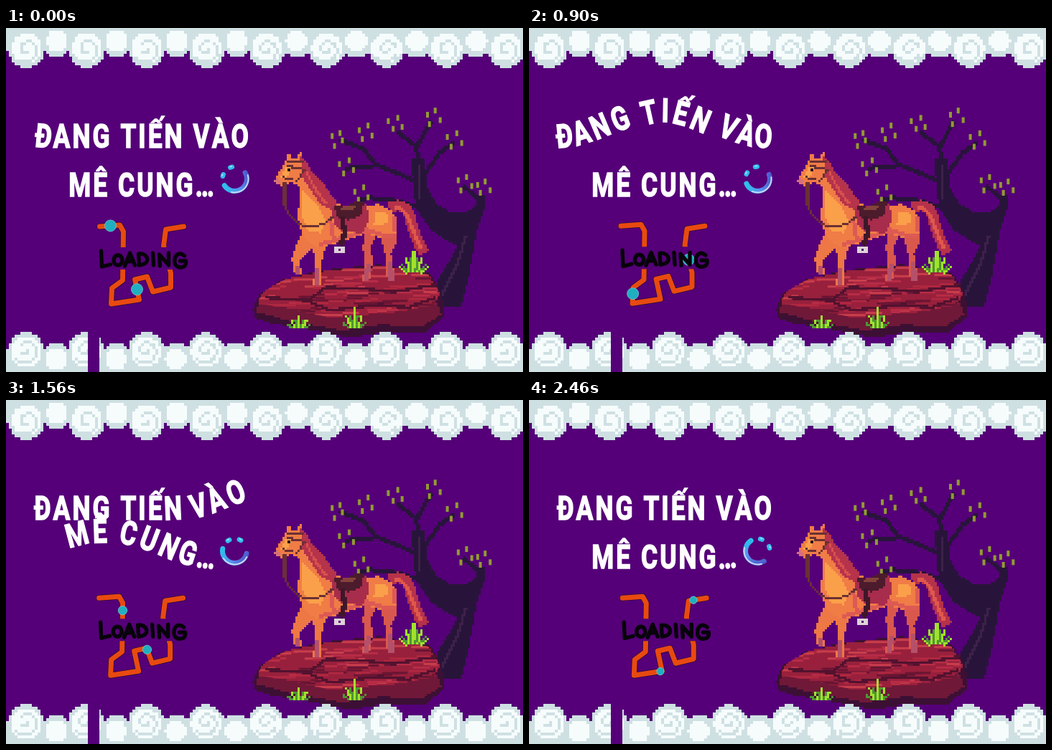
An HTML page with a canvas for the animation above (2520 ms loop, 720 by 480 pixels).

```html
<!DOCTYPE html>
<html lang="vi">
<head>
<meta charset="utf-8">
<style>
html, body { margin: 0; width: 100%; height: 100%; overflow: hidden; background: #550078; }
canvas { display: block; width: 720px; height: 480px; }
svg { display: none; }
</style>
</head>
<body>
<canvas id="stage" width="720" height="480"></canvas>
<svg><path id="track" d="M128,277 L156,275 L161,284 L160,352 L145,363 L144,385 L183,379 L177,351 L194,347 L202,368 L227,362 L227,342 L217,304 L220,281 L245,277"/></svg>
<script>
const LOOP = 2520, TICK = 60, TAU = Math.PI * 2;
const ctx = document.getElementById('stage').getContext('2d');
const scenery = document.createElement('canvas');
scenery.width = 720;
scenery.height = 480;
const art = scenery.getContext('2d');

let seed = 7;
const random = () => (seed = seed * 16807 % 2147483647) / 2147483647;

// Pixel art: every path is sampled on a square grid inside the current box.
let box, cell;
function region(left, top, right, bottom, size) {
  box = { left, top, right, bottom };
  cell = size;
}
function pixels(shape, color, width) {
  const path = typeof shape === 'string' ? new Path2D(shape) : shape;
  art.fillStyle = color;
  art.lineWidth = width || 1;
  for (let y = box.top; y < box.bottom; y += cell)
    for (let x = box.left; x < box.right; x += cell) {
      const px = x + cell / 2, py = y + cell / 2;
      if (width ? art.isPointInStroke(path, px, py) : art.isPointInPath(path, px, py)) art.fillRect(x, y, cell, cell);
    }
}

function disc(path, x, y, r) {
  path.moveTo(x + r, y);
  path.arc(x, y, r, 0, TAU);
}

// Swirls and small puffs alternate; side is 1 for the top row, -1 for the bottom row.
function clouds(edge, side, start) {
  const base = new Path2D(), white = new Path2D(), curls = new Path2D();
  const swirlY = edge + side * 30, puffY = edge + side * 21, pitch = 83.5;
  base.rect(0, Math.min(edge, edge + side * 30), 720, 30);
  for (let x = start; x < 760; x += pitch) {
    disc(base, x, swirlY, 25);
    disc(white, x, swirlY - side * 2, 21);
    disc(base, x + pitch / 2, puffY, 20);
    disc(white, x + pitch / 2, puffY - side * 3, 15);
    for (let a = 0; a < 9; a += 0.25) {
      const r = 2 + a * 1.9;
      curls[a ? 'lineTo' : 'moveTo'](x + r * Math.cos(a), swirlY + r * Math.sin(a));
    }
  }
  pixels(base, '#cfe0e3');
  pixels(white, '#f6fcfc');
  pixels(curls, '#cfe0e3', 3.5);
}

function grass(x, y, reach, height) {
  for (let i = -reach; i <= reach; i++) {
    const top = y - height * (1 - Math.abs(i) / (reach + 2)) + (i & 1) * 4;
    pixels(`M${x + i * 2.5},${y} L${x + i * 5.5},${top}`, i & 1 ? '#4f9434' : '#a2e22c', 3.5);
  }
}

function drawTree() {
  const bark = '#28143a';
  pixels('M590,390 L602,350 L622,318 L628,304 L612,296 L592,282 L574,256 L567,230 L566,182 L582,182 L586,222 L600,246 L622,258 L640,258 L654,248 L656,232 L666,232 L666,252 L656,282 L652,304 L644,350 L634,390Z', bark);
  pixels('M576,216 Q540,200 514,190 L498,168 L464,156 M516,192 L472,196 M590,260 Q550,234 492,238', bark, 6);
  pixels('M576,186 L570,164 L544,144 M572,166 L592,130 M580,208 L604,174 L624,160 M660,240 L636,220', bark, 6);
  pixels('M606,375 L630,326 L640,290 M576,240 L575,190', '#3d2149', 4);
  const tips = [[460, 154], [498, 146], [472, 194], [492, 232], [540, 134], [592, 124], [622, 156], [636, 216], [662, 222]];
  art.fillStyle = '#929b32';
  for (const [x, y] of tips)
    for (let a = 0.4; a < TAU; a += TAU / 4) {
      const r = 7 + random() * 5;
      art.fillRect(x + r * Math.cos(a), y + r * Math.sin(a) - 4, 4, 8);
    }
}

function drawRock() {
  pixels('M344,392 L352,372 L384,352 L440,338 L520,330 L590,342 L608,372 L610,402 L584,426 L530,424 L480,432 L420,420 L368,412 L346,404Z', '#3c1034');
  pixels('M348,396 L356,376 L400,392 L450,404 L520,398 L600,382 L606,400 L580,416 L520,414 L470,422 L400,410Z', '#701838');
  const slab = new Path2D('M350,384 L358,368 L390,350 L450,338 L530,332 L588,344 L604,370 L596,386 L548,396 L500,400 L450,404 L400,392Z');
  pixels(slab, '#98203c');
  art.save();
  art.clip(slab);
  for (let i = 0; i < 60; i++) {
    const x = 345 + random() * 250, y = 336 + random() * 64, length = 12 + random() * 34;
    art.fillStyle = ['#b82c46', '#6a1534', '#b02840', '#c83e4c'][i % 4];
    art.fillRect(x, y, length, 3);
    art.fillRect(x + length, y - 3, length / 2, 3);
  }
  art.restore();
  pixels('M360,376 L420,380 L446,362 L500,364 L540,368 L600,358 M420,380 L450,394 L520,386 L560,390 L598,376', '#52122f', 4);
}

function drawHorse() {
  pixels('M534,251 Q556,241 563,264 Q568,290 582,314', '#b6324a', 15);
  pixels('M540,250 Q557,250 564,276 L578,308', '#e0584c', 5);
  pixels('M500,276 L520,280 L509,304 L510,328 L506,354 L496,354 L500,330 L497,306Z M518,278 L542,272 L544,298 L536,314 L542,352 L531,354 L528,316Z', '#d9584e');
  pixels('M414,284 L404,304 L398,322 L402,344 L412,344 L408,324 L420,312 L434,298Z M426,292 L446,300 L439,328 L438,360 L427,360 L431,334Z', '#ee7746');
  pixels('M405,332 L407,344 M434,334 L432,360 M505,330 L501,354 M535,326 L537,353', '#b4506a', 7);
  pixels('M394,172 L399,184 L404,183 L410,170 L414,184 L424,200 L438,222 L456,244 L480,250 L520,246 L536,254 L544,270 L542,292 L522,294 L502,286 L470,298 L440,306 L424,302 L412,286 L406,264 L409,240 L409,222 L398,214 L388,221 L377,218 L375,209 L384,196 L390,184Z', '#f07c46');
  pixels('M412,226 L434,246 L446,270 L438,286 L420,282 L411,260Z M514,256 L530,258 L532,272 L512,276Z M392,190 L402,194 L388,210 L382,208Z', '#fba04a');
  pixels('M436,302 L470,293 L502,282 L524,289 L540,290 M540,264 L541,284 M452,270 L456,292', '#dd5a54', 6);
  pixels('M410,180 L420,190 L430,206 L444,220 L460,242 L464,256 L450,252 L436,244 L424,226 L412,206Z', '#b5334b');
  pixels('M416,196 L428,220 L446,246', '#d9504c', 4);
  pixels('M454,250 L502,246 L506,268 L496,286 L466,284 L456,272Z', '#a82c4c');
  pixels('M456,246 L470,250 L486,242 L498,242 L496,260 L478,268 L462,264Z', '#4c1b2c');
  pixels('M466,252 L488,250', '#84443b', 4);
  pixels('M468,264 L472,286 L466,304', '#3f1729', 7);
  pixels('M460,306 h9 v7 h-9Z', '#ded2d8', 3);
  pixels('M390,192 L416,198 L404,216 M392,186 L414,186 M384,208 L400,212 M388,216 L388,248 Q398,272 420,278 Q446,276 456,262', '#6b3034', 3);
  pixels('M376,211 L382,217', '#d8707a', 7);
  art.fillStyle = '#2c1024';
  art.fillRect(392, 196, 4, 4);
}

function drawScenery() {
  art.fillStyle = '#550078';
  art.fillRect(0, 0, 720, 480);
  region(340, 104, 680, 440, 3);
  drawTree();
  drawRock();
  drawHorse();
  grass(408, 418, 3, 18);
  grass(485, 418, 3, 28);
  grass(568, 342, 4, 32);
  region(0, 0, 720, 60, 4);
  clouds(0, 1, 29);
  region(0, 424, 720, 480, 4);
  clouds(480, -1, 28);
  art.fillStyle = '#550078';
  art.fillRect(114, 424, 16, 56);
}

// Heading: a raised-cosine bump runs through the letters of both lines.
const FONT = 'bold 46px Roboto, sans-serif', CONDENSE = 0.77, HEIGHT = 36, REACH = 5.3;
const letters = [];
function layoutLine(text, baseline) {
  ctx.font = FONT;
  const advance = char => ctx.measureText(char).width * CONDENSE + 3;
  let x = 188.5 - [...text].reduce((sum, char) => sum + advance(char), -3) / 2;
  for (const char of text) {
    const width = advance(char);
    if (char !== ' ') letters.push({ char, x: x + (width - 3) / 2, y: baseline });
    x += width;
  }
}

function drawHeading(t) {
  const peak = (t - 450) / 91.5;
  ctx.font = FONT;
  ctx.textAlign = 'center';
  ctx.fillStyle = ctx.strokeStyle = '#fff';
  ctx.lineWidth = 1.6;
  letters.forEach(({ char, x, y }, index) => {
    const d = Math.max(-REACH, Math.min(REACH, index - peak));
    const angle = Math.PI * d / REACH;
    const slope = HEIGHT * Math.PI / 2 / REACH * Math.sin(angle) / 25;
    ctx.save();
    ctx.translate(x, y - HEIGHT * Math.cos(angle / 2) ** 2);
    ctx.rotate(Math.atan(slope));
    ctx.scale(CONDENSE, 1);
    ctx.fillText(char, 0, 0);
    ctx.strokeText(char, 0, 0);
    ctx.restore();
  });
}

function drawSmile(t) {
  const tilt = -Math.PI / 4 * Math.cos(Math.PI * (t / LOOP) ** 1.5);
  const shade = ctx.createLinearGradient(-18, -8, 18, 12);
  shade.addColorStop(0, '#27c6ec');
  shade.addColorStop(0.55, '#5a8ff0');
  shade.addColorStop(1, '#4a50c4');
  const arc = (r, from, to, color, width) => {
    ctx.beginPath();
    ctx.arc(0, 0, r, from, to);
    ctx.strokeStyle = color;
    ctx.lineWidth = width;
    ctx.stroke();
  };
  ctx.save();
  ctx.translate(318.5, 210.5);
  ctx.rotate(tilt);
  ctx.lineCap = 'round';
  arc(17, 0.25, 3.35, shade, 7);
  arc(19, 0.5, 2.6, '#c3daf6', 2);
  for (const mid of [-2.06, -1.08]) {
    arc(17, mid - 0.08, mid + 0.08, '#35b9ef', 6.5);
    arc(18, mid - 0.05, mid + 0.05, '#8fe4f6', 2);
  }
  ctx.restore();
}

// Two dots half a track apart; the track runs hidden behind the word.
const track = document.getElementById('track');
const maze = new Path2D(track.getAttribute('d'));
const word = new Path2D('M130,311 L131,333 L143,330 M153,317 a6,7 0 1 0 1,0 M163,332 L170,314 L177,331 M166,326 L175,325 M182,315 L183,331 Q196,329 194,321 Q191,314 182,315 M202,314 L203,331 M212,332 L211,316 L224,331 L224,314 M246,318 Q238,311 233,320 Q230,333 240,334 Q249,334 248,325 L240,325');

function drawMaze(t) {
  const step = Math.floor(t % 1260 / 120);
  ctx.save();
  ctx.translate(1 + 1.5 * Math.cos(step * TAU / 11), Math.sin(step * 2.4) * 0.8);
  ctx.lineCap = ctx.lineJoin = 'round';

  ctx.save();
  ctx.beginPath();
  ctx.rect(110, 260, 160, 46);
  ctx.rect(110, 337, 160, 60);
  ctx.clip();
  ctx.strokeStyle = '#2d0638';
  ctx.lineWidth = 8.5;
  ctx.stroke(maze);
  ctx.strokeStyle = '#e84a10';
  ctx.lineWidth = 7;
  ctx.stroke(maze);
  ctx.restore();

  const radius = 6.5 + 1.5 * Math.cos(step * TAU / 7);
  const half = 186, length = track.getTotalLength();
  for (const start of [15, 15 + half]) {
    const along = start + step / 11 * half;
    if (along > length) continue;
    const { x, y } = track.getPointAtLength(along);
    ctx.beginPath();
    ctx.arc(x, y, radius, 0, TAU);
    ctx.fillStyle = '#1fafc0';
    ctx.fill();
    ctx.strokeStyle = '#75cbd2';
    ctx.lineWidth = 0.8;
    ctx.stroke();
  }
  ctx.strokeStyle = '#07030a';
  ctx.lineWidth = 5.4;
  ctx.stroke(word);
  ctx.restore();
}

layoutLine('ĐANG TIẾN VÀO', 167);
layoutLine('MÊ CUNG…', 235);
drawScenery();

function frame() {
  const t = Math.floor(performance.now() % LOOP / TICK) * TICK;
  ctx.drawImage(scenery, 0, 0);
  drawHeading(t);
  drawSmile(t);
  drawMaze(t);
  requestAnimationFrame(frame);
}
frame();
</script>
</body>
</html>
```
